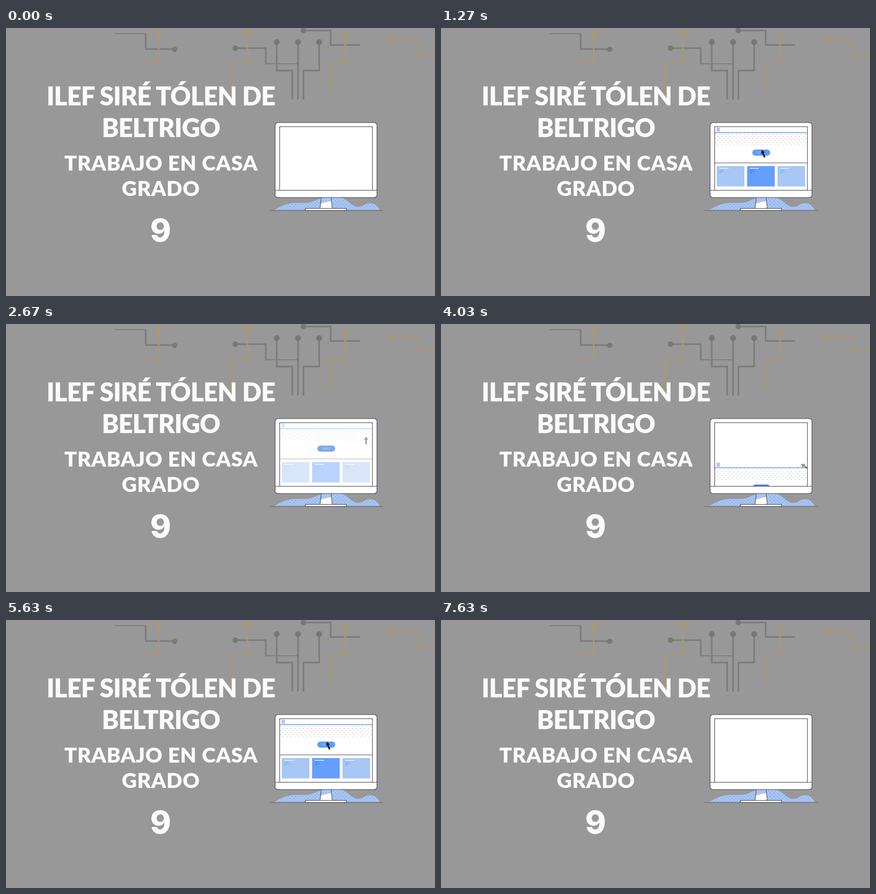
An HTML page for the animation above (7.66 s loop, 946 by 592 pixels).

```html
<!DOCTYPE html>
<html lang="es">
<head>
<meta charset="utf-8">
<title>Trabajo en casa</title>
<style>
html, body { margin: 0; width: 100%; height: 100%; overflow: hidden; background: #989898; }
svg { display: block; width: 100vw; height: 100vh; }
text { font-family: Lato, "Open Sans", sans-serif; font-weight: 900; fill: #fbfbfb; text-anchor: middle; }
.title { font-size: 56px; letter-spacing: -1px; }
.subtitle { font-size: 46px; letter-spacing: .8px; }
.grade { font: 800 70px Inter, sans-serif; }
.wire { fill: none; stroke-width: 3.4; }
.dark { stroke: #7b7b7b; }
.gold { stroke: #a69a75; stroke-width: 3; }
.ink { stroke: #3b3b44; stroke-width: 1.15; }
</style>
</head>
<body>
<svg viewBox="0 0 946 592">
  <defs>
    <clipPath id="screen"><rect x="604" y="218.5" width="203.5" height="139"/></clipPath>
    <pattern id="grain" width="8" height="8" patternUnits="userSpaceOnUse">
      <circle cx="2" cy="2" r=".75" fill="#58719f"/>
      <circle cx="6" cy="6" r=".75" fill="#58719f"/>
    </pattern>
    <pattern id="dots" x="604" y="233" width="9" height="9" patternUnits="userSpaceOnUse">
      <circle cx="2.25" cy="2.25" r=".7" fill="#777b86"/>
      <circle cx="6.75" cy="6.75" r=".7" fill="#777b86"/>
    </pattern>
    <path id="hill" d="M590 402.500C604 396 616 387 638 386.500C655 386 667 388 680 382C689 377 699 375 712 375H738C755 377 759 394.500 777 395C789 395 790 387 803 387C815 387 822 396 824 402.500Z"/>
  </defs>
  <rect width="946" height="592" fill="#989898"/>

  <g class="wire dark">
    <path d="M308 12V46.500H372M506 44.500H573V79M597 31V94H631V158M644 31V158M690.500 31V94H656V158M655 5.500H716V37.500H781"/>
    <path d="M240 12.500H309M572 79H644" stroke-width="2"/>
  </g>
  <path class="wire gold" d="M336.500 12V77.500H303M533 9V78.500H494.500V150M748 18V78H716V142M848 28H908.500V59.500H946"/>
  <g id="nodes"></g>

  <text class="title" x="341.500" y="171">ILEF SIRÉ TÓLEN DE</text>
  <text class="title" x="341.500" y="240.500">BELTRIGO</text>
  <text class="subtitle" x="342" y="315">TRABAJO EN CASA</text>
  <text class="subtitle" x="341.500" y="371">GRADO</text>
  <text class="grade" x="341" y="471.500">9</text>

  <use href="#hill" fill="#a6c5f5"/>
  <use href="#hill" fill="url(#grain)"/>
  <path d="M581 403H831" stroke="#55555c" stroke-width="1.2"/>
  <path d="M695 375H717L719.500 398.500H692.500Z" fill="#fff"/>
  <path d="M695 375H717L718 382Q705 384 693.500 388.500Z" fill="#a6c5f5"/>
  <path class="ink" d="M695 375L692.500 398.500M717 375L719.500 398.500" fill="none"/>
  <rect class="ink" x="660" y="398.500" width="91" height="4.500" fill="#fff"/>
  <rect class="ink" x="593.500" y="209" width="224.500" height="165.500" rx="6" fill="#fff"/>
  <path class="ink" d="M594 358.500H818"/>

  <g clip-path="url(#screen)">
    <g id="page">
      <path d="M607.500 221.500h7.500m-7.500 3h7.500m-7.500 3h7.500" stroke="#5b93ee" stroke-width="1.3"/>
      <path d="M603 231.300H808" stroke="#5d8bd3" stroke-width="1.6"/>
      <rect x="604" y="233" width="204" height="25" fill="url(#dots)"/>
      <path class="ink" d="M603 298H808"/>
      <g id="cards"></g>
    </g>
    <g id="button">
      <rect x="686.500" y="268.500" width="39.500" height="13.500" rx="6.750"/>
      <path d="M696 274h20m-17 2.800h14" stroke="#9fc3fb" stroke-width="1"/>
    </g>
    <path id="cursor" fill="#20242c" d="M0 0L5 8H1.900V18H-1.900V8H-5Z"/>
  </g>
  <rect class="ink" x="603.500" y="218" width="204.500" height="140.500" fill="none"/>
</svg>
<script>
const byId = id => document.getElementById(id);
const [page, button, cursor] = ['page', 'button', 'cursor'].map(byId);

const node = color => ([x, y, r]) => `<circle cx="${x}" cy="${y}" r="${r}" fill="${color}"/>`;
byId('nodes').innerHTML =
  [[372, 47, 6], [506, 44.5, 6], [597, 31, 6.5], [644, 31, 6.5], [690.5, 31, 6.5], [655.5, 5.5, 6]]
    .map(node('#777')).join('') +
  [[336.5, 12, 6], [533, 9, 6.5], [748, 18.5, 5.5], [848, 28, 5.5]].map(node('#a89a6e')).join('');

byId('cards').innerHTML = [608, 675, 742].map((x, i) => `
  <rect x="${x}" y="305" width="61" height="45" fill="${i === 1 ? '#659fff' : '#a8c7f4'}"/>
  <path d="M${x + 6} 310h20" stroke="#f4f8ff" stroke-width="1.5"/>
  <path d="M${x + 6} 314h9m-9 3h11m-11 3h5" stroke="${i === 1 ? '#3d7ce0' : '#6fa2ef'}" stroke-width="1.1"/>`).join('');

const LOOP = 7660, CYCLE = LOOP / 2;
const clamp = v => Math.max(0, Math.min(1, v));
const span = (t, a, b) => clamp((t - a) / (b - a));
const smooth = p => p * p * (3 - 2 * p);
const lerp = (a, b, p) => a + (b - a) * p;
const mix = (a, b, p) => `rgb(${a.map((v, i) => Math.round(lerp(v, b[i], p)))})`;

// time, tip x, tip y, angle
const poses = [
  [230, 794, 309, -56],
  [630, 718, 284, -56],
  [850, 707, 269, -22],
  [2150, 707, 269, -22],
  [2670, 794, 248, 0]
];

function poseAt(t) {
  const next = poses.findIndex(p => p[0] > t);
  if (next === 0) return poses[0].slice(1);
  if (next < 0) return poses.at(-1).slice(1);
  const a = poses[next - 1], b = poses[next];
  const p = smooth(span(t, a[0], b[0]));
  return [1, 2, 3].map(i => lerp(a[i], b[i], p));
}

function draw(time) {
  const t = time % CYCLE;
  const offset = 142 * (1 - span(t, 80, 870)) ** 3;
  const shift = `translate(0 ${offset.toFixed(2)})`;
  page.setAttribute('transform', shift);
  button.setAttribute('transform', shift);
  page.setAttribute('opacity', 1 - span(t, 2480, 2820));
  button.setAttribute('opacity', 1 - span(t, 2550, 2880));

  const lit = span(t, 800, 900) * (1 - span(t, 2250, 2750));
  button.firstElementChild.setAttribute('fill', mix([47, 115, 212], [93, 155, 255], lit));

  const [x, y, angle] = poseAt(t);
  cursor.setAttribute('transform', `translate(${x} ${y}) rotate(${angle})`);
  cursor.setAttribute('opacity', span(t, 120, 290) * (1 - span(t, 2460, 2800)));
}

const start = performance.now();
function tick() {
  draw((performance.now() - start) % LOOP);
  requestAnimationFrame(tick);
}
tick();
</script>
</body>
</html>
```
